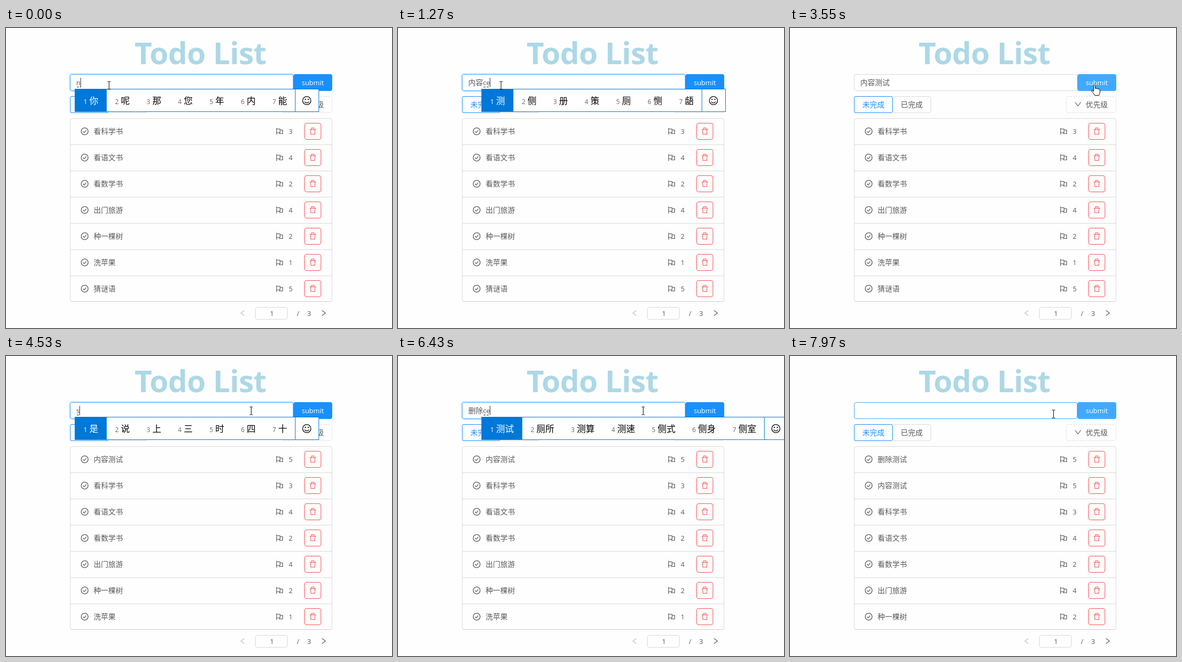
An HTML page that plays this animation: 736 px wide and 572 px high, repeating every 8000 ms.

```html
<!DOCTYPE html>
<html lang="zh-CN">
<head>
<meta charset="utf-8">
<title>Todo List</title>
<style>
  html, body { margin: 0; width: 100%; height: 100%; overflow: hidden; background: #fefefe; }
  svg { display: block; }
  text { font: 13px "Open Sans", "Noto Sans", sans-serif; fill: #595959; white-space: pre; }
  .zh { font: 14px "Noto Sans CJK SC", "Noto Sans CJK", sans-serif; }
  .word { font-size: 17px; fill: #000; }
  .num { font-size: 12px; fill: #666; }
  .title { font-size: 58px; font-weight: 700; letter-spacing: -.7px; fill: #add8e6; }
  .mid { text-anchor: middle; }
  .picked, .white { fill: #fff; }
  .blue { fill: #1890ff; }
</style>
</head>
<body>
<svg id="stage" width="736" height="572" viewBox="0 0 736 572"></svg>
<script>
const LOOP = 8000, stage = document.getElementById('stage');
const pen = document.createElement('canvas').getContext('2d');
pen.font = '13px "Open Sans", "Noto Sans", sans-serif';

const DELETE = '删除 擅长 山村 闪存 山城 山川 山茶';
const TEST = '测试 厕所 测算 测速 侧式 侧身 侧室';
const CE = '测 侧 册 策 厕 恻 龉';
const C = '才 从 长 出 成 次 查';
const S = '是 说 上 三 时 四 十';

// time, committed text, text being composed, candidates
const typing = [
  [0, '', 'n', '你 呢 那 您 年 内 能'],
  [130, '', 'ne', '呢 哪 讷 呐 那 内 能'],
  [280, '', 'nei', '内 那 哪 馁 氖 呢 能'],
  [430, '', 'neir', '内容 内人 内 那 哪 馁 氖'],
  [580, '', 'neiro', '内容 内 那 哪 馁 氖 呢'],
  [850, '内容', '', ''],
  [990, '内容', 'c', C],
  [1270, '内容', 'ce', CE],
  [1830, '内容', 'ces', TEST],
  [2140, '内容测试', '', ''],
  [3820, '', '', ''],
  [4390, '', 's', ''],
  [4530, '', 's', S],
  [4650, '', 'sh', S],
  [4780, '', 'sha', '啥 杀 沙 傻 纱 厦 莎'],
  [5040, '', 'shanc', DELETE],
  [5310, '', 'shan', '山 闪 善 衫 扇 删 陕'],
  [5460, '', 'shan', DELETE],
  [5610, '', 'shanc', DELETE],
  [5740, '', 'shanch', DELETE],
  [5870, '', 'shanchu', DELETE],
  [6000, '删除', '', ''],
  [6140, '删除', 'c', C],
  [6290, '删除', 'ce', CE],
  [6430, '删除', 'ce', TEST],
  [6590, '删除', 'ces', TEST],
  [6720, '删除测试', '', ''],
  [7970, '', '', '']
];

// time, x, y, pointer shape
const mouse = [
  [0, 196, 109, 'beam'], [2730, 553, 121, 'arrow'], [2870, 572, 113, 'hand'],
  [3000, 580, 108, 'hand'], [3820, 467, 104, 'beam'], [7130, 500, 106, 'beam'],
  [7270, 542, 108, 'beam'], [7410, 578, 108, 'hand'], [7970, 502, 110, 'beam']
];

const todos = [['删除测试', 5], ['内容测试', 5], ['看科学书', 3], ['看语文书', 4], ['看数学书', 2],
  ['出门旅游', 4], ['种一棵树', 2], ['洗苹果', 1], ['猜谜语', 5]];

const at = (list, t) => list.filter(step => step[0] <= t).pop();
const within = (t, a, b) => t >= a && t < b;
const label = (x, y, s, cls = '') => `<text x="${x}" y="${y}" class="${cls}">${s}</text>`;
const line = (d, color = '#595959', w = 1.2, more = '') =>
  `<path d="${d}" fill="none" stroke="${color}" stroke-width="${w}" ${more}/>`;
const frame = (x, y, w, h, color, r = 3.5, more = '') =>
  `<rect x="${x + .5}" y="${y + .5}" width="${w - 1}" height="${h - 1}" rx="${r}" fill="none" stroke="${color}" ${more}/>`;
const block = (x, y, w, h, color, r = 0) =>
  `<rect x="${x}" y="${y}" width="${w}" height="${h}" rx="${r}" fill="${color}"/>`;

const pointers = {
  beam: line('M-3 -7.5h2.5l.5 .5l.5-.5h2.5M0 -7v14M-3 7.5h2.5l.5-.5l.5 .5h2.5', '#000', 1),
  arrow: '<path d="M.5 .5v15.5l3.6-3.4l2.6 5.9l2.4-1l-2.6-5.8h4.8z" fill="#fff" stroke="#000"/>',
  hand: '<path d="M-1.5 1q1.5-2 3 0v6q1.5-1.5 3 .3q2-1 3 .7q2-.7 3 1v5q0 3-2 6h-8q-1-3-6-8q0-2 2-1.5l2 2z" fill="#fff" stroke="#000"/>'
};

function row([name, level], i) {
  const icons = '<circle cx="150" cy="25" r="6.6" fill="none" stroke="#595959" stroke-width="1.3"/>' +
    line('M146.8 25l2.4 2.6l3.9-5') +
    line('M516 18.5v13M516 20.5h6.5v7h-6.5M522.5 22.5h5v7h-6v-2') +
    frame(569, 9, 32, 32, '#ff4d4f') +
    line('M579 21.5h12M582.8 21v-2.5h4.4v2.5M580.7 22l.6 8.5h7.4l.6-8.5', '#ff4d4f', 1.1);
  return `<g transform="translate(0 ${172 + 50 * i})">${icons}` +
    label(167, 30, name, 'zh') + label(539, 30, level) +
    (i ? line('M123 .5h498', '#d9d9d9', 1) : '') + '</g>';
}

const fixed =
  label(245, 69, 'Todo List', 'title') +
  frame(195, 130, 74, 32, '#d9d9d9') + block(194, 130, 3, 32, '#fefefe') +
  frame(122, 130, 74, 32, '#1890ff', 2.5) +
  label(138, 151, '未完成', 'zh blue') + label(211, 151, '已完成', 'zh') +
  frame(526, 130, 96, 32, '#d9d9d9', 3.5, 'stroke-dasharray="3 2"') +
  line('M543.5 141.5l5.5 7l5.5-7') + label(564, 151, '优先级', 'zh') +
  frame(122, 172, 500, 350, '#d9d9d9') + line('M124 521.5h496', '#ccc', 1) +
  line('M454.5 538.5l-6.5 5l6.5 5', '#bfbfbf') + frame(475, 532, 62, 24, '#d9d9d9') +
  label(507, 549, 1, 'mid') + label(557, 549, '/', 'mid') + label(578, 549, 3, 'mid') +
  line('M602.5 538.5l6.5 5l-6.5 5');

function field(t, done, composing) {
  const blurred = within(t, 3130, 3820) || t >= 7550;
  const border = blurred && t < 7970 ? '#d9d9d9' : '#40a9ff';
  const start = 134 + 14 * done.length;
  const end = Math.round(start + pen.measureText(composing).width) + .5;
  const caret = !blurred && !within(t, 2730, 3820) && t < 7130;
  return (blurred ? '' : frame(120.5, 86.5, 429, 35, '#1890ff', 5, 'stroke-width="2" opacity=".2"')) +
    block(122, 88, 426, 32, '#fff', 4) + frame(122, 88, 426, 32, border) +
    label(134, 109, done, 'zh') + label(start, 109, composing) +
    (composing ? line(`M${start + 1} 112.5H${end}`, '#222', 1, 'stroke-dasharray="4 2"') : '') +
    (caret ? line(`M${end} 95v18`, '#333', 1) : '');
}

function submit(t) {
  const first = t < 4000, begin = first ? 2870 : 7270, click = first ? 3130 : 7550;
  const hover = within(t, 2870, 3820) || t >= 7270 ? Math.min(1, (t - begin) / 300) : 0;
  const mix = (a, b) => Math.round(a + (b - a) * hover);
  const age = (t - click) / 540;
  const spread = 4 * Math.min(1, age);
  const wave = age > 0 && age < 1 && (first ? t < 3670 : true)
    ? `<g opacity="${.2 * (1 - age)}">${block(548 - spread, 88 - spread, 74 + 2 * spread, 32 + 2 * spread, '#1890ff', 4 + spread)}</g>` : '';
  return wave + block(548, 88, 74, 32, `rgb(${mix(24, 64)},${mix(144, 169)},255)`, 4) +
    label(585, 109, 'submit', 'mid white');
}

function popup(done, candidates) {
  if (!candidates) return '';
  const words = candidates.split(' '), left = 131 + 14 * done.length;
  let x = left, cells = '';
  words.forEach((word, i) => {
    const picked = i ? '' : ' picked';
    cells += label(x + 17, 145, i + 1, 'num' + picked) + label(x + 28, 145, word, 'zh word' + picked);
    x += 43 + 17 * word.length;
  });
  const face = `<g transform="translate(${x + 22.5} 138.5)">` +
    '<circle r="7.8" fill="none" stroke="#000" stroke-width="1.3"/>' +
    '<circle cx="-2.8" cy="-2.4" r="1.2"/><circle cx="2.8" cy="-2.4" r="1.2"/>' +
    line('M-4.3 1.8q4.3 5.4 8.6 0', '#000') + '</g>';
  return block(left, 116, x - left + 46, 44, '#fff') +
    block(left, 116, 44 + 17 * words[0].length, 44, '#0078d7') +
    frame(left, 116, x - left + 46, 44, '#0078d7', 0) +
    line(`M${x + .5} 116v44`, '#0078d7', 1) + cells + face;
}

function draw(now) {
  const t = now % LOOP;
  const [, done, composing, candidates] = at(typing, t);
  const [, x, y, shape] = at(mouse, t);
  const skip = t < 3820 ? 2 : t < 7970 ? 1 : 0;
  stage.innerHTML = fixed + todos.slice(skip, skip + 7).map(row).join('') +
    submit(t) + field(t, done, composing) + popup(done, candidates) +
    `<g transform="translate(${x + .5} ${y + .5})">${pointers[shape]}</g>`;
}

const begun = performance.now();
function tick() {
  draw(performance.now() - begun);
  requestAnimationFrame(tick);
}
tick();
</script>
</body>
</html>
```
